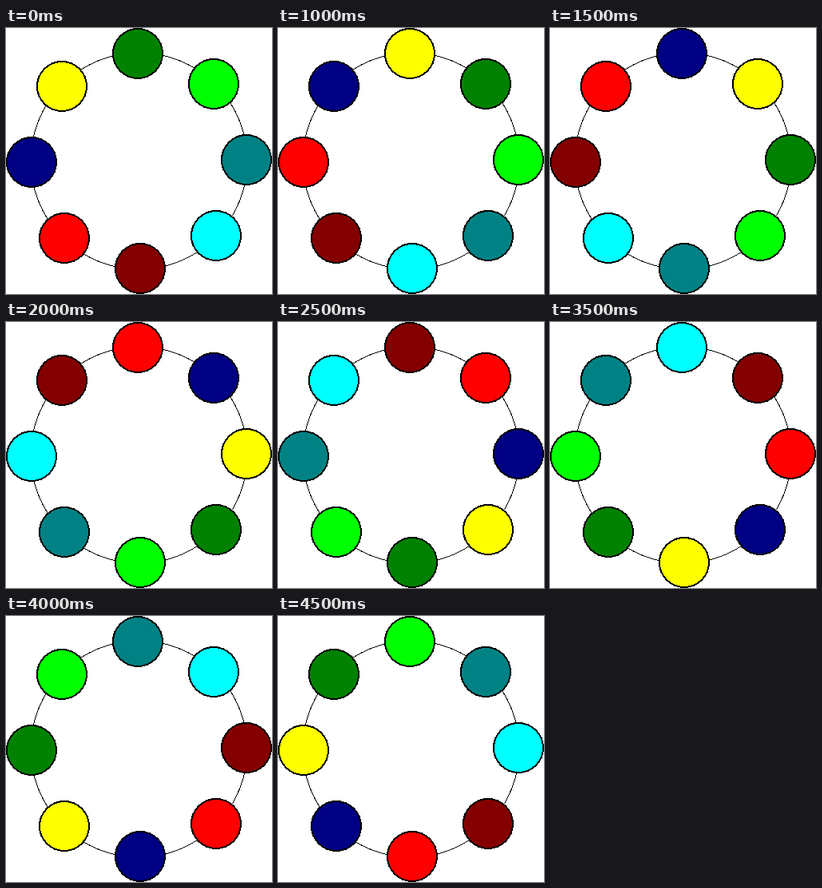
An HTML page that plays this animation: 333x333 px, repeating every 5000 ms.

```html
<!DOCTYPE html>
<html lang="en">
<head>
<meta charset="utf-8">
<title>Colour ring</title>
<style>
  html, body { margin: 0; width: 100%; height: 100%; overflow: hidden; background: #fff; }
  svg { display: block; width: 100%; height: 100%; }
  circle { stroke: #000; shape-rendering: crispEdges; }
</style>
</head>
<body>
<svg id="stage" viewBox="0 0 333 333"></svg>
<script>
const LOOP = 5000;
const STEPS = [1000, 1500, 2000, 2500, 3500, 4000, 4500];
// Clockwise from the top
const COLORS = ['#008200', '#00ff00', '#008284', '#00ffff',
                '#840000', '#ff0000', '#000084', '#ffff00'];
const COUNT = COLORS.length;
const CENTER = 166.5, RING = 135.5, ORBIT = 134.5, DISC = 31, TILT = -0.0135;

const stage = document.getElementById('stage');

function addCircle(cx, cy, r, width) {
  const el = document.createElementNS(stage.namespaceURI, 'circle');
  const attrs = { cx, cy, r, fill: '#fff', 'stroke-width': width };
  for (const name in attrs) el.setAttribute(name, attrs[name]);
  return stage.appendChild(el);
}

addCircle(CENTER, CENTER, RING, 1);

const discs = COLORS.map((_, i) => {
  const a = (i / COUNT) * 2 * Math.PI - Math.PI / 2 + TILT;
  return addCircle(Math.round(CENTER + ORBIT * Math.cos(a)),
                   Math.round(CENTER + ORBIT * Math.sin(a)), DISC, 2);
});

let shown = -1;

function draw(time) {
  const t = time % LOOP;
  const step = STEPS.filter(s => t >= s).length;
  if (step === shown) return;
  shown = step;
  discs.forEach((disc, i) =>
    disc.setAttribute('fill', COLORS[(i - step + COUNT) % COUNT]));
}

const start = performance.now();
function tick() {
  draw(performance.now() - start);
  requestAnimationFrame(tick);
}
tick();
</script>
</body>
</html>
```
